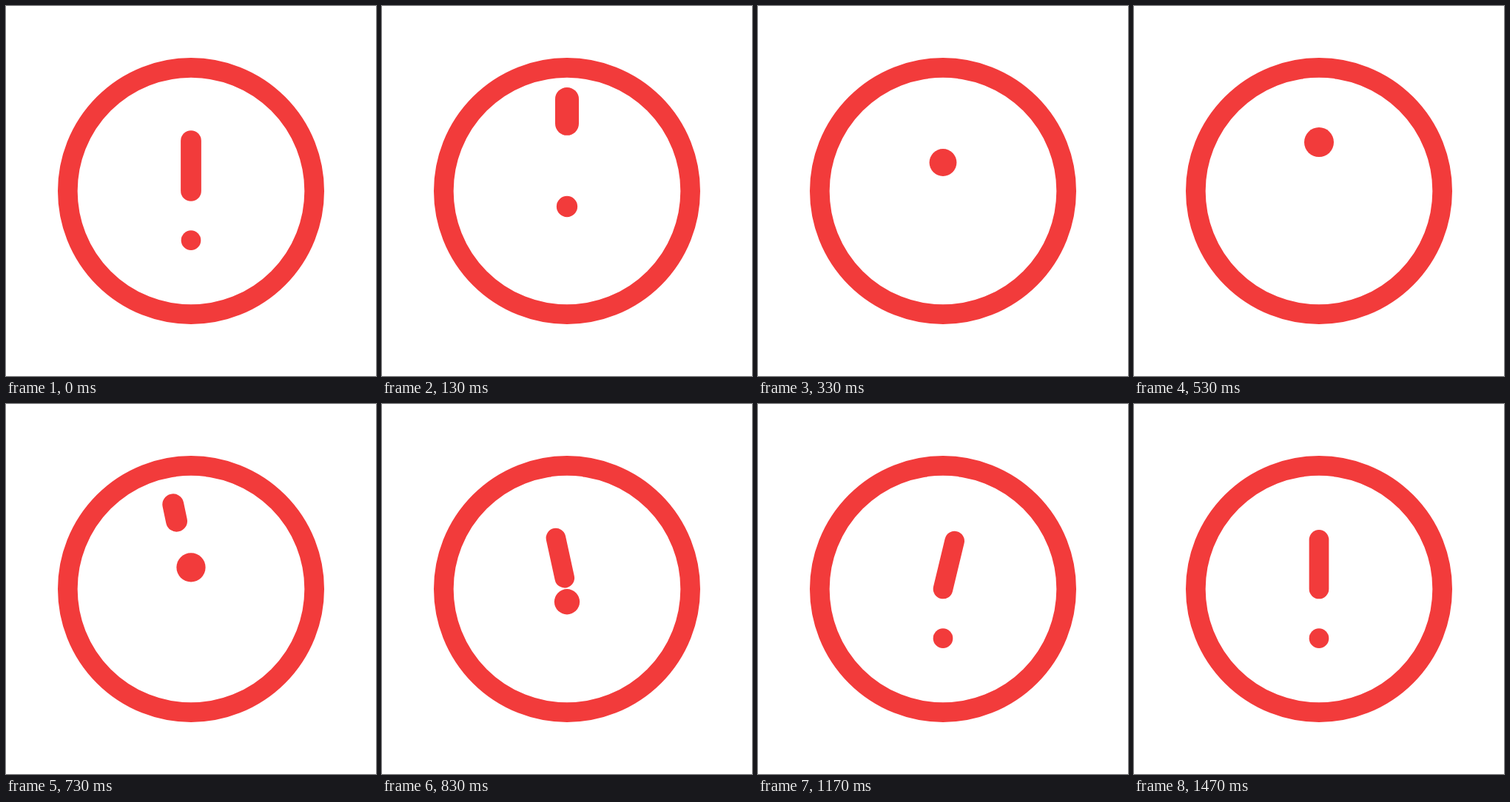
Animation of 500x500 px, one loop 1800 ms. Source, as an HTML page:

```html
<!DOCTYPE html>
<html lang="en">
<head>
<meta charset="utf-8">
<title>Alert icon</title>
<style>
  html, body { margin: 0; height: 100%; overflow: hidden; background: #fff; }
  svg { display: block; width: 100%; height: 100%; }
</style>
</head>
<body>
<svg viewBox="-250 -250 500 500">
  <clipPath id="inside"><circle r="160"/></clipPath>
  <g clip-path="url(#inside)">
    <line id="bar" stroke="#f23b3b" stroke-linecap="round"/>
  </g>
  <circle id="dot" fill="#f23b3b"/>
  <circle r="166.67" fill="none" stroke="#f23b3b" stroke-width="26.67"/>
</svg>
<script>
const LOOP = 1800, FPS = 30;
const RIM = 166.67, BAR = 66.67, THIN = 26.67;
const bar = document.getElementById('bar');
const dot = document.getElementById('dot');

const linear = u => u;
const inOut = u => (1 - Math.cos(Math.PI * u)) / 2;
const out = u => Math.sin(Math.PI * u / 2);

// Each further key is [time, value, easing]; times are in steps of 1/30 s.
function track(time, start, value, ...keys) {
  for (const [end, next, ease = inOut] of keys) {
    if (time <= start) return value;
    if (time < end) return value + (next - value) * ease((time - start) / (end - start));
    start = end;
    value = next;
  }
  return value;
}

function set(el, attrs) {
  for (const name in attrs) el.setAttribute(name, attrs[name]);
}

function draw(s) {
  const top = track(s, -0.6, BAR, [7.8, RIM], [18, RIM], [26, BAR]);
  const bottom = track(s, 0, 0, [7.55, RIM], [18, RIM], [26.7, 0]);
  const angle = track(s, 17, 0, [23.5, -13.7], [34, 13.9], [44, 0]);
  set(bar, {
    y1: -top,
    y2: -bottom,
    'stroke-width': track(s, -1, THIN, [4, 32, linear], [18, 32], [25, THIN, linear]),
    transform: `rotate(${angle})`,
    visibility: s >= 8 && s <= 18 ? 'hidden' : 'visible'
  });
  set(dot, {
    cy: track(s, 0.25, BAR, [17.1, -BAR, out], [17.3, -BAR], [30.5, BAR]),
    r: track(s, 1, THIN / 2, [14.3, 20], [20.4, 20], [30.5, THIN / 2])
  });
}

function tick() {
  const t = performance.now() % LOOP;
  draw(Math.floor((t + 3.4) * FPS / 1000));
  requestAnimationFrame(tick);
}
tick();
</script>
</body>
</html>
```
